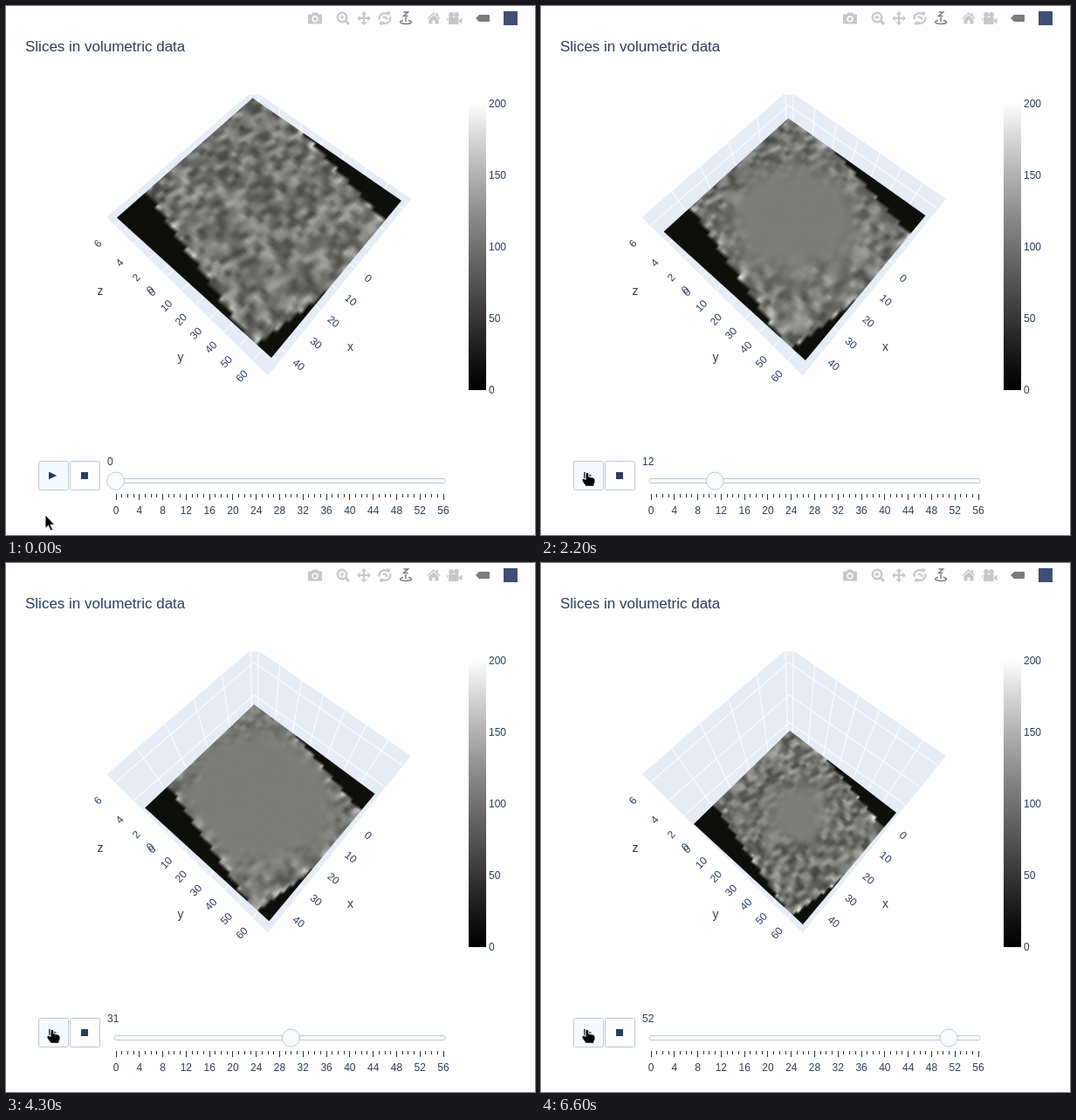
An HTML page with a canvas that plays this animation: 606x606 px, repeating every 6700 ms.

```html
<!DOCTYPE html>
<html lang="en">
<head>
<meta charset="utf-8">
<title>Slices in volumetric data</title>
<style>
  html, body { margin: 0; width: 100%; height: 100%; overflow: hidden; background: #fefefe; }
  svg, canvas { position: absolute; left: 0; top: 0; display: block; }
  text { font-family: "Liberation Sans", Arial, sans-serif; font-size: 12px; fill: #2a3f5f; }
</style>
</head>
<body>
<svg id="stage" width="606" height="606" viewBox="0 0 606 606">
  <defs>
    <linearGradient id="scale" x1="0" y1="1" x2="0" y2="0"></linearGradient>
    <clipPath id="scene"><rect x="80" y="101.5" width="440" height="340"/></clipPath>
  </defs>
  <text x="22" y="52" style="font-size:17px">Slices in volumetric data</text>

  <g id="modebar" fill="#c7c7c7" stroke="none">
    <path fill-rule="evenodd" d="M347 9.500h3l1.500-2h5l1.500 2h3q1 0 1 1v9q0 1-1 1h-14q-1 0-1-1v-9q0-1 1-1zM354 11a3.800 3.800 0 1 0 .01 0zM354 12.700a2.200 2.200 0 1 1-.01 0z"/>
    <g fill="none" stroke="#c7c7c7">
      <circle cx="385" cy="13" r="5.200" stroke-width="2.400"/>
      <path d="M389 17l4 4" stroke-width="3"/>
      <path d="M382.500 13h5M385 10.500v5" stroke-width="1.500"/>
      <path d="M404 14h12M410 8v12" stroke-width="2"/>
      <path d="M428 15.500a6 5.500 0 0 1 9.500-6M440 12.500a6 5.500 0 0 1-9.500 6" stroke-width="2.200"/>
      <path d="M431.500 13q4-1.500 5.500 3" stroke-width="2"/>
    </g>
    <path d="M402 14l3.500-3.500v7zM418 14l-3.500-3.500v7zM410 6l-3.500 3.500h7zM410 22l-3.500-3.500h7zM436 6l4.500 1-2 4.500zM432 22l-4.500-1 2-4.500z"/>
    <g fill="none" stroke="#7b7b7b" stroke-width="1.500">
      <path d="M455.500 7h5l-5 4.500h5M458 13v5"/>
      <path d="M455 16.500c-5 1-5 3.700 3 3.900s8-2.900 3-3.900"/>
    </g>
    <path d="M482.500 14L490 7l3 2.800V8h2v3.700l2.500 2.300-1 1L490 9l-6.500 6zM484.500 15.300L490 10.200l5.500 5.100V20.500h-4v-4h-3v4h-4z"/>
    <circle cx="510" cy="10" r="2.900"/><circle cx="516" cy="10" r="2.900"/>
    <path d="M507 13h11.500v8H507zM519 16l3.500-2.500v7L519 18zM506 14v3h-1v-3z"/>
    <path fill="#7b7b7b" d="M538 14l4-4h11q1 0 1 1v6q0 1-1 1h-11z"/>
    <rect x="570" y="6" width="16" height="16" fill="#3f4f75"/>
  </g>

  <g id="box" clip-path="url(#scene)"></g>
  <g id="axes" text-anchor="middle"></g>

  <rect x="530" y="112" width="20" height="328" fill="url(#scale)"/>
  <g id="bar"></g>

  <g stroke="#bec8d9" stroke-width="1">
    <rect x="37.500" y="521.500" width="34" height="33" rx="2" fill="#f4faff"/>
    <rect x="73.500" y="521.500" width="34" height="33" rx="2" fill="#fefefe"/>
    <rect x="124" y="541.500" width="379" height="5" rx="2" fill="#f8fafc"/>
    <circle id="grip" cx="126" cy="544" r="10" fill="#f8fafc"/>
  </g>
  <path d="M49 533.500l9.300 4.400-9.300 4.400zM86 534h8v8h-8z" fill="#2a3f5f"/>
  <g id="ticks" text-anchor="middle"></g>
  <text id="value" x="116" y="526">0</text>

  <path id="arrow" d="M0 0v15.300l3.500-3.200 2.600 5.900 2.400-1-2.600-5.800h4.700z" fill="#000" stroke="#fff" stroke-width=".8"/>
  <path id="hand" d="M0 1.200q1.400-2 2.800 0v3.800l5 .9q2.200.6 2.200 2.600v2.700l-1.200 2.300v1.700H0l-3.800-5.200q-1-2.500 1-2.800l2.800 1.200z" fill="#000" stroke="#fff" stroke-width="2" paint-order="stroke"/>
</svg>
<canvas id="slice"></canvas>

<script>
const LOOP = 6700, STEP = 375 / 56;
const PAUSES = [1800, 2800, 4000, 5000, 6200];
const GRAYS = [0, 16, 38, 59, 81, 102, 124, 146, 171, 197, 224, 253];
const $ = id => document.getElementById(id);
const lerp = (a, b, t) => a + (b - a) * t;
const mix = (p, q, t) => [lerp(p[0], q[0], t), lerp(p[1], q[1], t)];
const clamp = (x, lo, hi) => Math.max(lo, Math.min(hi, x));
const smooth = t => { t = clamp(t, 0, 1); return t * t * (3 - 2 * t); };
const range = n => [...Array(n).keys()];

// Fixed chart parts
const label = (s, x, y, turn = 0) =>
  `<text transform="translate(${x} ${y}) rotate(${turn})" y="4.2">${s}</text>`;

function drawBox() {
  const roof = { t: [283.5, 96.5], l: [115.5, 242], r: [464, 221] };
  const floor = { t: [285, 213], l: [181, 306], r: [401, 297], b: [300, 423.5] };
  const line = (...pts) => 'M' + pts.map(p => p.map(n => n.toFixed(1))).join('L');
  let d = '';
  for (const i of range(5)) {
    const t = .02 + .194 * i, foot = mix(floor.t, floor.l, t);
    d += line(mix(roof.t, roof.l, t), foot, mix(floor.r, floor.b, t));
  }
  for (const i of range(7)) {
    const t = .03 + .1375 * i, foot = mix(floor.t, floor.r, t);
    d += line(mix(roof.t, roof.r, t), foot, mix(floor.l, floor.b, t));
  }
  for (const s of [.148, .47, .74, .97])
    d += line(...['l', 't', 'r'].map(c => mix(roof[c], floor[c], s)));
  $('box').innerHTML =
    `<path d="${line(roof.t, roof.r, floor.b, roof.l)}Z" fill="#e5ecf6"/>` +
    `<path d="${d}" fill="none" stroke="#fff" stroke-width="1.2" stroke-opacity=".85"/>`;
}

function drawLabels() {
  let s = label(6, 105, 272, -48) + label(4, 130, 294, -48) +
          label(2, 149, 311, -48) + label(0, 165, 325, -48);
  for (const i of range(7)) s += label(i * 10, 167 + 16.4 * i + .13 * i * i, 328 + 15.2 * i + .13 * i * i, -46);
  for (const i of range(5)) s += label(i * 10, 415 - 19.9 * i, 312 + 24.7 * i, 40);
  for (const [c, x, y] of [['z', 108, 331], ['y', 200, 407], ['x', 394.5, 395]])
    s += `<text x="${x}" y="${y}" style="font-size:14px">${c}</text>`;
  $('axes').innerHTML = s;

  $('bar').innerHTML = range(5).map(i => label(i * 50, 553, 440 - 82 * i)).join('');
  $('scale').innerHTML = GRAYS.map((g, i) =>
    `<stop offset="${i / 11}" stop-color="rgb(${g},${g},${Math.max(0, g - 1)})"/>`).join('');

  let d = '', names = '';
  for (const i of range(57)) {
    const x = 126 + i * STEP, major = i % 4 === 0;
    d += `M${Math.round(x - .5) + .5} 559v${major ? 7 : 4}`;
    if (major) names += label(i, x, 578);
  }
  $('ticks').innerHTML = `<path d="${d}" stroke="#333" stroke-width="1"/>` + names;
}

// Synthetic volume
const NU = 67, NV = 47, DARK = 14;
const grid = new Float32Array(NU * NV);

function hash(x, y, z) {
  let h = Math.imul(x, 374761393) ^ Math.imul(y, 668265263) ^ Math.imul(z, 1274126177);
  h = Math.imul(h ^ (h >>> 13), 1103515245);
  h = Math.imul(h ^ (h >>> 16), 2246822519);
  return ((h ^ (h >>> 15)) >>> 0) / 2147483648 - 1;
}

function noise(x, y, z) {
  const i = Math.floor(x), j = Math.floor(y), k = Math.floor(z);
  const a = smooth(x - i), b = smooth(y - j), c = smooth(z - k);
  const row = (m, n) => lerp(hash(i, m, n), hash(i + 1, m, n), a);
  const sheet = n => lerp(row(j, n), row(j + 1, n), b);
  return lerp(sheet(k), sheet(k + 1), c);
}

function fillGrid(k) {
  const calm = .38 * Math.sqrt(Math.max(0, 1 - ((k - 28) / 27) ** 2));
  for (let j = 0; j < NV; j++) for (let i = 0; i < NU; i++) {
    const u = i / (NU - 1), v = j / (NV - 1);
    const edge = Math.min(.805 + .23 * u - v, v - .24 * (u - .37), 1.145 - .23 * v - u);
    let g = DARK;
    if (edge > 0) {
      // A sheared lattice keeps the grain from lining up with the texels
      const n = noise((i + .5 * j) / 2.2, (j - .3 * i) / 1.8, k * .45);
      const wide = noise(i / 7 + 50, j / 5, k * .2);
      const dist = Math.hypot(u - .47, v - .47) + .05 * wide;
      const amp = .03 + .97 * smooth((dist - 1.35 * calm + .18) / .25);
      const rim = Math.exp(-edge / .025);
      g = 124 - 8 * amp + amp * (52 * n + 8 * wide) + rim * Math.max(0, n) * 120;
    }
    grid[j * NU + i] = clamp(g, DARK, 253);
  }
}

function sample(u, v) {
  const x = clamp(u, 0, 1) * (NU - 1), y = clamp(v, 0, 1) * (NV - 1);
  const i = Math.min(x | 0, NU - 2), j = Math.min(y | 0, NV - 2), p = j * NU + i;
  return lerp(lerp(grid[p], grid[p + 1], x - i),
              lerp(grid[p + NU], grid[p + NU + 1], x - i), y - j);
}

// Slice seen in perspective
const X0 = 120, Y0 = 98, W = 340, H = 322;
const canvas = $('slice'), ctx = canvas.getContext('2d');
canvas.width = W;
canvas.height = H;
canvas.style.left = X0 + 'px';
canvas.style.top = Y0 + 'px';
const image = ctx.createImageData(W, H);

// First pose, last pose, foreshortening
const CORNERS = [
  [[282.5, 105.5], [285, 192], .0064],
  [[453, 223], [407, 286], .007],
  [[304, 403], [300, 414], .007],
  [[127, 242.5], [175, 299], .0085]
];

function quad(k) {
  return CORNERS.map(([a, b, c]) => mix(a, b, k * (1 + 51 * c) / (51 * (1 + c * k))));
}

function drawSlice(k) {
  fillGrid(k);
  const pts = quad(k).map(([x, y]) => [x - X0, y - Y0]);
  const [[tx, ty], [rx, ry], [bx, by], [lx, ly]] = pts;
  const sx = tx - rx + bx - lx, sy = ty - ry + by - ly;
  const den = (rx - bx) * (ly - by) - (lx - bx) * (ry - by);
  const g = (sx * (ly - by) - (lx - bx) * sy) / den;
  const h = ((rx - bx) * sy - sx * (ry - by)) / den;
  const a = rx - tx + g * rx, b = lx - tx + h * lx;
  const d = ry - ty + g * ry, e = ly - ty + h * ly;
  const px = image.data;
  const top = Math.max(0, Math.floor(ty) - 1);
  for (let y = top; y < H; y++) for (let x = 0; x < W; x++) {
    const X = x + .5, Y = y + .5;
    const m = a - g * X, n = b - h * X, p = d - g * Y, q = e - h * Y;
    const det = m * q - n * p;
    const u = ((X - tx) * q - n * (Y - ty)) / det;
    const v = (m * (Y - ty) - (X - tx) * p) / det;
    const s = sample(u, v), o = (y * W + x) * 4;
    px[o] = px[o + 1] = s;
    px[o + 2] = s - 3;
    px[o + 3] = 255;
  }
  ctx.putImageData(image, 0, 0);
  canvas.style.clipPath = `polygon(${pts.map(([x, y]) => `${x}px ${y}px`).join()})`;
}

function stepAt(t) {
  if (t < 900) return 0;
  if (t < 1100) return 1;
  return 1 + Math.floor((t - 1000) / 100) - PAUSES.filter(p => p <= t).length;
}

function drawPointer(t) {
  const n = clamp(Math.floor(t / 100) - 1, 0, 4);
  const over = n > 2;
  const [x, y] = [[45, 583], [46, 576], [48, 562], [51, 545], [51.5, 534.5]][n];
  $('arrow').setAttribute('visibility', over ? 'hidden' : 'visible');
  $('hand').setAttribute('visibility', over ? 'visible' : 'hidden');
  $(over ? 'hand' : 'arrow').setAttribute('transform', `translate(${x} ${y})`);
}

let shown = -1;
function render() {
  const t = performance.now() % LOOP;
  const step = stepAt(t), k = Math.max(0, step - 1);
  $('value').textContent = step;
  $('grip').setAttribute('cx', 125.6 + k * STEP);
  drawPointer(t);
  if (k !== shown) drawSlice(shown = k);
  requestAnimationFrame(render);
}

drawBox();
drawLabels();
render();
</script>
</body>
</html>
```
